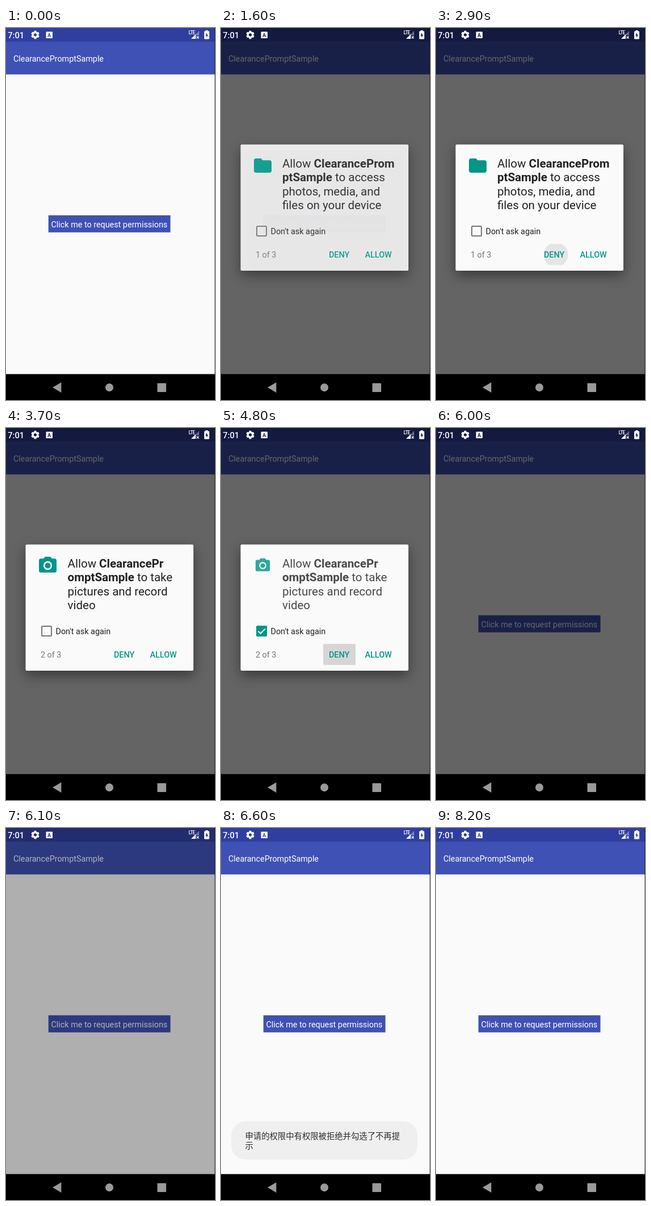
These frames come from a looping animation (368x653 px, 8700 ms). An HTML page with a canvas:

```html
<!DOCTYPE html>
<html lang="zh-CN">
<head>
<meta charset="utf-8">
<title>Runtime permissions</title>
<style>
html, body { margin: 0; width: 100%; height: 100%; overflow: hidden; background: #000; }
canvas { display: block; width: 368px; height: 653px; }
</style>
</head>
<body>
<canvas id="stage"></canvas>
<script>
const W = 368, H = 653, LOOP = 8700, STEP = 100;
const SCREEN_W = 367.5, NAV_TOP = 607.5;
const TEAL = '#009688', INDIGO = '#3f51b5', INK = '#212121', PAPER = '#fafafa';
const SANS = 'Roboto, sans-serif';
const CJK = '"Noto Sans CJK SC", "Noto Sans CJK", "Noto Sans CJK JP", sans-serif';
const APP = 'ClearancePromptSample';

const canvas = document.getElementById('stage');
const c = canvas.getContext('2d');
const dpr = window.devicePixelRatio || 1;
canvas.width = W * dpr;
canvas.height = H * dpr;

const clamp = v => Math.min(1, Math.max(0, v));
const ramp = (t, from, to) => clamp((t - from) / (to - from));
const easeOut = p => 1 - (1 - p) ** 3;

const FOLDER = new Path2D('M10 4H4c-1.1 0-2 .9-2 2v12c0 1.1.9 2 2 2h16c1.1 0 2-.9 2-2V8c0-1.1-.9-2-2-2h-8z');
const CAMERA = new Path2D('M9 2L7.2 4H4c-1.1 0-2 .9-2 2v12c0 1.1.9 2 2 2h16c1.1 0 2-.9 2-2V6c0-1.1-.9-2-2-2h-3.2L15 2z' +
  'M12 17a5 5 0 1 1 0-10a5 5 0 1 1 0 10zM12 15.2a3.2 3.2 0 1 1 0-6.4a3.2 3.2 0 1 1 0 6.4z');
const PHONE = new Path2D('M6.6 10.8c1.4 2.8 3.8 5.1 6.6 6.6l2.2-2.2c.3-.3.7-.4 1-.2 1.1.4 2.3.6 3.6.6.6 0 1 .4 1 1V20c0 .6-.4 1-1 1-9.4 0-17-7.6-17-17 0-.6.4-1 1-1h3.5c.6 0 1 .4 1 1 0 1.3.2 2.5.6 3.6.1.4 0 .7-.3 1z');

// Text between asterisks is bold.
const split = n => [`Allow *${APP.slice(0, n)}*`, `*${APP.slice(n)}* to `];
const page = (icon, n, ...rest) => {
  const lines = split(n);
  lines[1] += rest.shift();
  return { icon, lines: lines.concat(rest) };
};
const PAGES = [
  page(FOLDER, 13, 'access', 'photos, media, and', 'files on your device'),
  page(CAMERA, 11, 'take', 'pictures and record', 'video'),
  page(PHONE, 13, 'make', 'and manage phone', 'calls')
];
const CLICKS = [2880, 4720, 5880];

function group(draw, alpha = 1) {
  c.save();
  c.globalAlpha *= alpha;
  draw();
  c.restore();
}

function rect(x, y, w, h, color, r = 0) {
  c.fillStyle = color;
  c.beginPath();
  c.roundRect(x, y, w, h, r);
  c.fill();
}

function disc(x, y, r, color) {
  c.fillStyle = color;
  c.beginPath();
  c.arc(x, y, r, 0, Math.PI * 2);
  c.fill();
}

function poly(points, color) {
  c.fillStyle = color;
  c.beginPath();
  points.forEach(([x, y]) => c.lineTo(x, y));
  c.fill();
}

function line(points, color, width) {
  c.strokeStyle = color;
  c.lineWidth = width;
  c.beginPath();
  points.forEach(([x, y], i) => i ? c.lineTo(x, y) : c.moveTo(x, y));
  c.stroke();
}

function text(str, x, y, color, size = 14.35, weight = 400, family = SANS) {
  c.font = `${weight} ${size}px ${family}`;
  c.fillStyle = color;
  c.fillText(str, x, y);
  return c.measureText(str).width;
}

function activity() {
  rect(0, 0, W, H, PAPER);
  rect(0, 0, W, 81.5, INDIGO);
  rect(0, 0, W, 24, '#303f9f');
  text(APP, 13, 59, '#fff');
  rect(74.7, 328.8, 214.8, 30, INDIGO);
  text('Click me to request permissions', 79.5, 350, '#fff');
}

function gear(x, y) {
  group(() => {
    c.translate(x, y);
    c.rotate(Math.PI / 6);
    c.strokeStyle = '#fff';
    c.lineWidth = 3.2;
    c.beginPath();
    c.arc(0, 0, 4.2, 0, Math.PI * 2);
    c.stroke();
    for (let i = 0; i < 6; i++) {
      rect(4, -2, 3.2, 4, '#fff', 0.5);
      c.rotate(Math.PI / 3);
    }
  });
}

function statusIcons(dim) {
  const bar = `rgb(${[48, 63, 159].map(v => Math.round(v * (1 - 0.6 * dim)))})`;
  text('7:01', 3.2, 17.5, '#fff', 14.7, 500);
  gear(51.5, 12);

  rect(70.5, 6.5, 11.5, 11.5, '#fff', 1);
  text('A', 73, 15.5, bar, 9, 700);

  poly([[326, 19], [340, 5], [340, 19]], 'rgba(255,255,255,.35)');
  poly([[326, 19], [334, 11], [334, 19]], '#fff');
  rect(334, 13, 7, 7, bar);
  line([[335.5, 14.5], [339.5, 18.5]], '#fff', 1.2);
  line([[339.5, 14.5], [335.5, 18.5]], '#fff', 1.2);
  group(() => {
    c.letterSpacing = '-0.8px';
    text('LTE', 321.5, 11, '#fff', 8.2, 500);
  });

  rect(349, 5.5, 9, 14, '#fff', 1);
  rect(351.5, 4, 4, 2, '#fff');
  poly([[354, 8], [351, 13.2], [353, 13.2], [353, 17], [356, 11.8], [354, 11.8]], bar);
}

function navBar() {
  rect(0, NAV_TOP, W, H - NAV_TOP, '#000');
  poly([[82, 631], [97.3, 622], [97.3, 640]], '#9a9a9a');
  disc(182, 631, 7, '#9a9a9a');
  rect(266.5, 623.5, 15.5, 15.5, '#9a9a9a', 1);
}

function richLine(str, x, y) {
  str.split('*').forEach((part, i) => {
    if (part) x += text(part, x, y, INK, 20.5, i % 2 ? 700 : 400);
  });
}

function description({ icon, lines }, scale, alpha, shift) {
  if (scale <= 0) return;
  group(() => {
    c.translate(73.5, 241.5);
    c.scale(1.55 * scale, 1.55 * scale);
    c.translate(-12, -12);
    c.fillStyle = TEAL;
    c.fill(icon, 'evenodd');
  }, alpha);
  group(() => {
    c.beginPath();
    c.rect(100, 220, 214, 110);
    c.clip();
    lines.forEach((str, i) => richLine(str, 108 + shift, 245 + i * 24.3));
  }, alpha);
}

function checkbox(t) {
  const on = ramp(t, 3950, 4150) * (1 - ramp(t, 5020, 5290));
  const halo = ramp(t, 3900, 4150);
  const fade = 1 - ramp(t, 4200, 4500);
  if (t >= 4000 && fade > 0) disc(71.5, 356.5, 20.5 * halo, `rgba(0,0,0,${0.12 * fade})`);
  c.strokeStyle = '#757575';
  c.lineWidth = 2;
  c.beginPath();
  c.roundRect(63, 348, 17, 17, 1.5);
  c.stroke();
  if (on > 0) group(() => {
    rect(62, 347, 19, 19, TEAL, 2);
    c.translate(71.5, 356.5);
    c.scale(on, on);
    line([[-6, 0.3], [-2, 4.3], [6.3, -4]], '#fff', 2.1);
  }, on);
  text("Don't ask again", 87.5, 361.5, INK);
}

function denyRipple(age) {
  if (age < 0 || age >= 300) return;
  const press = ramp(age, -60, 80);
  group(() => {
    c.beginPath();
    c.roundRect(180, 379, 57, 37, 1.5);
    c.clip();
    disc(211, 398, 40 * press ** 1.1, '#000');
  }, 0.145 * press * (1 - ramp(age, 180, 300)));
}

function dialog(t) {
  group(() => {
    c.shadowColor = 'rgba(0,0,0,.45)';
    c.shadowBlur = 22 * dpr;
    c.shadowOffsetY = 8 * dpr;
    rect(34.5, 204.5, 295.5, 221.5, PAPER, 2);
  });

  const step = CLICKS.filter(at => t >= at).length;
  const age = step ? t - CLICKS[step - 1] : -1;
  const swapped = step > 0 && step < 3 && age >= 300;
  const index = step === 0 ? 0 : swapped ? step : step - 1;

  if (swapped) {
    const p = easeOut(ramp(age, 580, 860));
    description(PAGES[index], p, 1, 206 * (1 - p));
  } else {
    const gone = step ? ramp(age, 20, 220) ** 1.4 : 0;
    description(PAGES[index], 1 - gone, 1 - gone, 0);
  }

  checkbox(t);
  denyRipple(age);
  text(`${index + 1} of 3`, 61, 403, '#757575');
  text('DENY', 190, 403, TEAL, 14.35, 500);
  const locked = t >= 4000 && t < 4800;
  text('ALLOW', 253.5, 403, locked ? '#bcbcbc' : TEAL, 14.35, 500);
}

function toast() {
  rect(18, 515, 328, 67, '#efefef', 25);
  text('申请的权限中有权限被拒绝并勾选了不再提', 42.5, 546, '#2c2c2c', 14.35, 400, CJK);
  text('示', 42.5, 562.5, '#2c2c2c', 14.35, 400, CJK);
}

function render(t) {
  c.setTransform(dpr, 0, 0, dpr, 0, 0);
  activity();
  const toastAlpha = ramp(t, 6100, 6600) * (1 - ramp(t, 7700, 8200));
  const dim = t < 1600 ? 0 : 1 - ramp(t, 6000, 6200);
  rect(0, 0, W, H, `rgba(0,0,0,${0.6 * dim})`);
  if (toastAlpha > 0) group(toast, toastAlpha);
  if (t >= 1600 && t < 6000) group(() => dialog(t), t < 1700 ? 0.9 : 1);
  statusIcons(dim);
  navBar();
  rect(SCREEN_W, 0, W - SCREEN_W, H, '#000');
}

const start = performance.now();
function tick() {
  const t = (performance.now() - start) % LOOP;
  render(Math.floor(t / STEP) * STEP);
  requestAnimationFrame(tick);
}
tick();
</script>
</body>
</html>
```
